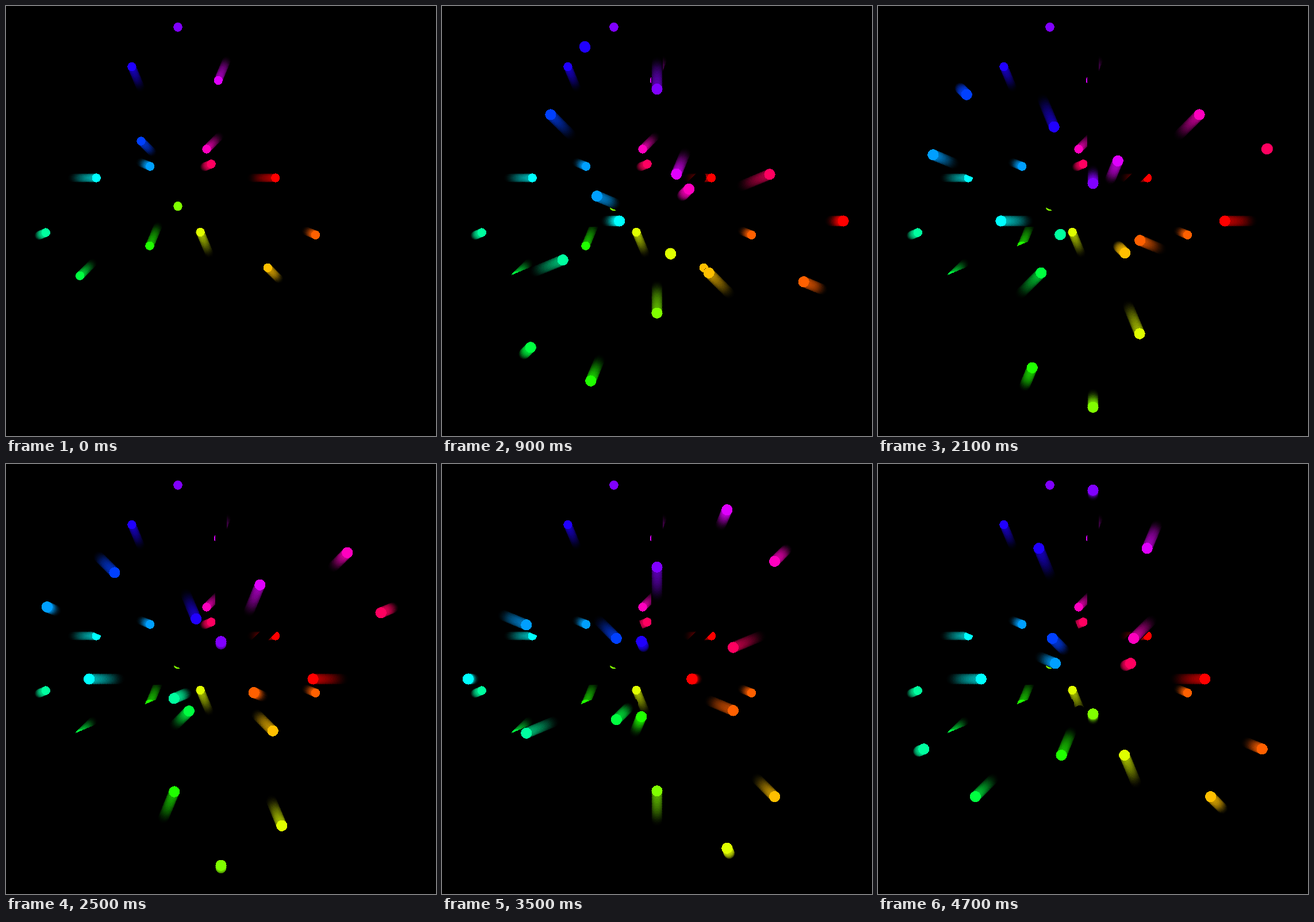
These frames come from a looping animation (748 by 748 pixels, 4.8 s). An HTML page:

```html
<!DOCTYPE html>
<html lang="en">
<head>
<meta charset="utf-8">
<title>Pulsing colour wheel</title>
<style>
  html, body { margin: 0; width: 100%; height: 100%; overflow: hidden; background: #000; }
  svg { display: block; width: 748px; height: 748px; shape-rendering: crispEdges; }
</style>
</head>
<body>
<svg id="stage" viewBox="0 0 748 748"></svg>
<script>
const STEPS = 48, STEP_MS = 100;
const BALLS = 16, TRAIL = 20;
const MID = 194.7, SWING = 134, RADIUS = 9.6, WIPE = 10;
const TRAIL_STEPS = 3;      // trail length, in animation steps
const TRAIL_ALPHA = 0.17;

const stage = document.getElementById('stage');

function add(parent, tag, attrs) {
  const el = document.createElementNS('http://www.w3.org/2000/svg', tag);
  for (const name in attrs) el.setAttribute(name, attrs[name]);
  parent.appendChild(el);
  return el;
}

// Distance of a ball from the hub; angle in degrees, clockwise from the right.
function reach(angle, step) {
  const phase = 360 / STEPS * (step + 1) + 3 * angle;
  return MID + SWING * Math.sin(phase * Math.PI / 180);
}

const angles = Array.from({ length: BALLS }, (_, i) => i * 360 / BALLS);

function makeWheel(center, scale) {
  const root = add(stage, 'g', { transform: `translate(${center} ${center}) scale(${scale})` });
  const spokes = angles.map(angle => {
    const spoke = add(root, 'g', { transform: `rotate(${angle})`, fill: `hsl(${angle}, 100%, 50%)` });
    const discs = [];
    for (let i = TRAIL; i >= 0; i--) {
      const alpha = i ? TRAIL_ALPHA * (1 - i / (TRAIL + 1)) : 1;
      const el = add(spoke, 'circle', { r: RADIUS, 'fill-opacity': alpha.toFixed(4) });
      discs.push({ el, lag: TRAIL_STEPS * i / TRAIL });
    }
    return { angle, discs };
  });
  return {
    root,
    pose(step) {
      for (const { angle, discs } of spokes)
        for (const { el, lag } of discs)
          el.setAttribute('cx', reach(angle, step - lag).toFixed(2));
    }
  };
}

// The small wheel stays behind; the large wheel's paths wipe it away.
makeWheel(299, 0.8).pose(0);

const wipeRoot = add(stage, 'g', {
  transform: 'translate(374 374)', stroke: '#000',
  'stroke-width': 2 * WIPE, 'stroke-linecap': 'round'
});
const wipes = angles.map(angle => ({
  angle, el: add(wipeRoot, 'line', { transform: `rotate(${angle})`, y1: 0, y2: 0 })
}));

function wipeTo(step) {
  for (const { angle, el } of wipes) {
    let near = Infinity, far = 0;
    for (let s = 1 - 0.85 * TRAIL_STEPS; s <= step + 0.01; s += 0.05) {
      const r = reach(angle, s);
      near = Math.min(near, r);
      far = Math.max(far, r);
    }
    el.setAttribute('x1', near.toFixed(2));
    el.setAttribute('x2', far.toFixed(2));
  }
}

const wheel = makeWheel(374, 1);
const start = performance.now();
let shown = -1;

function draw() {
  const step = Math.floor((performance.now() - start) / STEP_MS) % STEPS;
  if (step !== shown) {
    shown = step;
    const display = step ? 'inline' : 'none';
    wipeRoot.style.display = wheel.root.style.display = display;
    if (step) {
      wipeTo(step);
      wheel.pose(step);
    }
  }
  requestAnimationFrame(draw);
}
draw();
</script>
</body>
</html>
```
